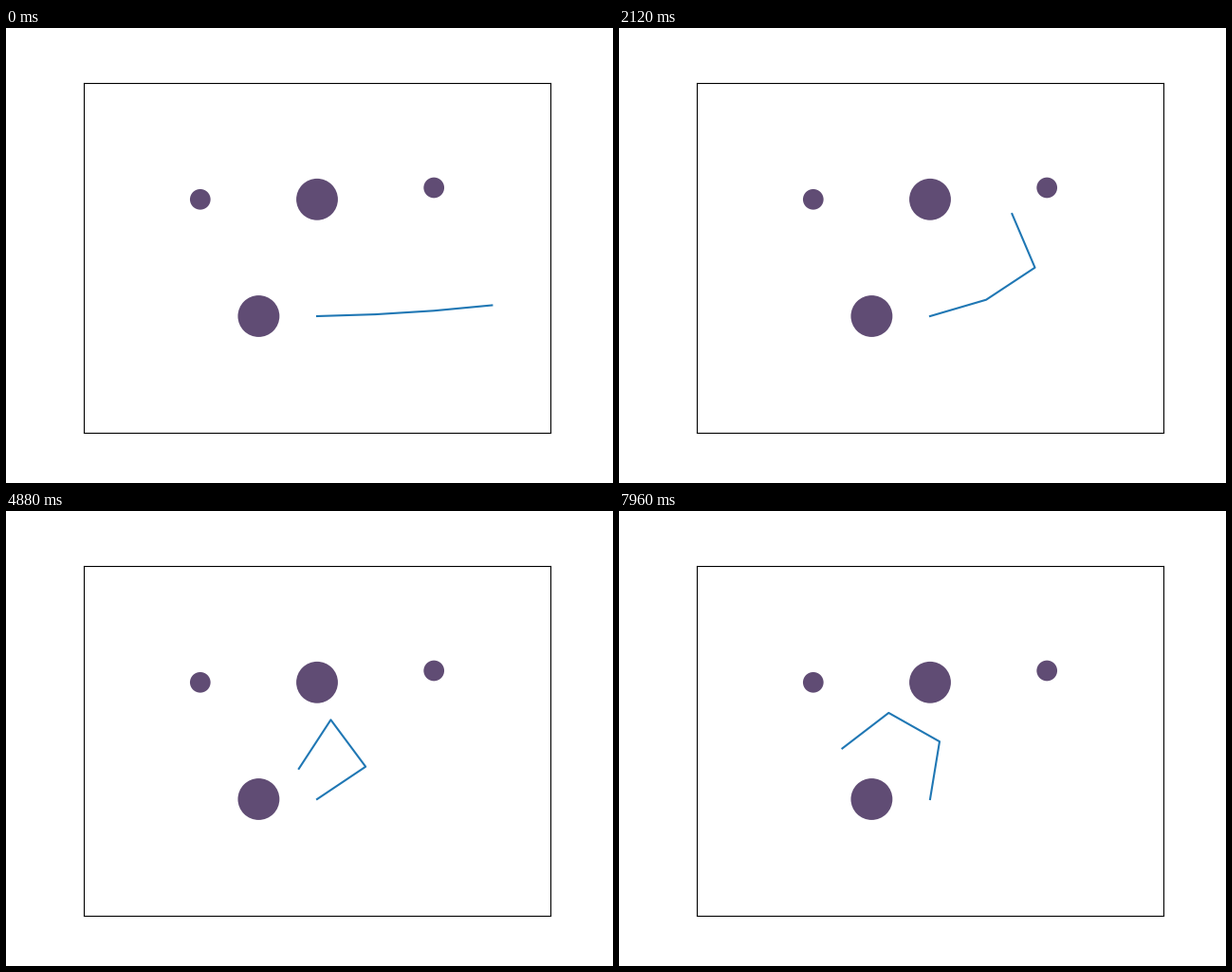
Write a matplotlib script that moves like this. It is 640 px wide and 480 px high and loops after 8000 ms.

```python
import numpy as np
import matplotlib.pyplot as plt
from matplotlib.animation import FuncAnimation
from matplotlib.patches import Circle

FRAMES, INTERVAL = 200, 40
SMALL, LARGE = 0.176, 0.356

# Each joint turns at a steady rate between a few (step, radians) turning points
SHOULDER = [(0, 0.031), (21, 0.238), (103, 0.358), (122, 0.59),
            (150, 1.1), (168, 1.165), (199, 1.408)]
ELBOW = [(0, 0.031), (21, 0.22), (70, 0.34), (103, 1.367),
         (122, 1.62), (156, 1.561), (177, 1.09), (199, 1.22)]
WRIST = [(0, 0.032), (21, 0.625), (33, 0.79), (70, 1.9), (103, 1.866),
         (122, 1.924), (156, 1.927), (177, 1.68), (199, 1.168)]


def angle(joint, step):
    steps, angles = zip(*joint)
    return np.interp(step, steps, angles)


def arm_points(step):
    """Joint positions of a three-link arm with unit links."""
    heading = np.cumsum([angle(j, step) for j in (SHOULDER, ELBOW, WRIST)])
    points = np.cumsum(np.exp(1j * heading))
    return np.append(0, points.real), np.append(0, points.imag)


fig, ax = plt.subplots(figsize=(6.4, 4.8), dpi=100)
ax.set(xlim=(-4, 4), ylim=(-2, 4), aspect="equal", xticks=[], yticks=[])
for x, y, r in [(-2, 2, SMALL), (2, 2.2, SMALL), (0, 2, LARGE), (-1, 0, LARGE)]:
    ax.add_patch(Circle((x, y), r, facecolor="#604c74", linewidth=0))
arm, = ax.plot([], [], color="tab:blue", linewidth=1.5)


def update(step):
    arm.set_data(*arm_points(step))
    return arm,


anim = FuncAnimation(fig, update, frames=FRAMES, interval=INTERVAL,
                     repeat=True, repeat_delay=0)
plt.show()
```
